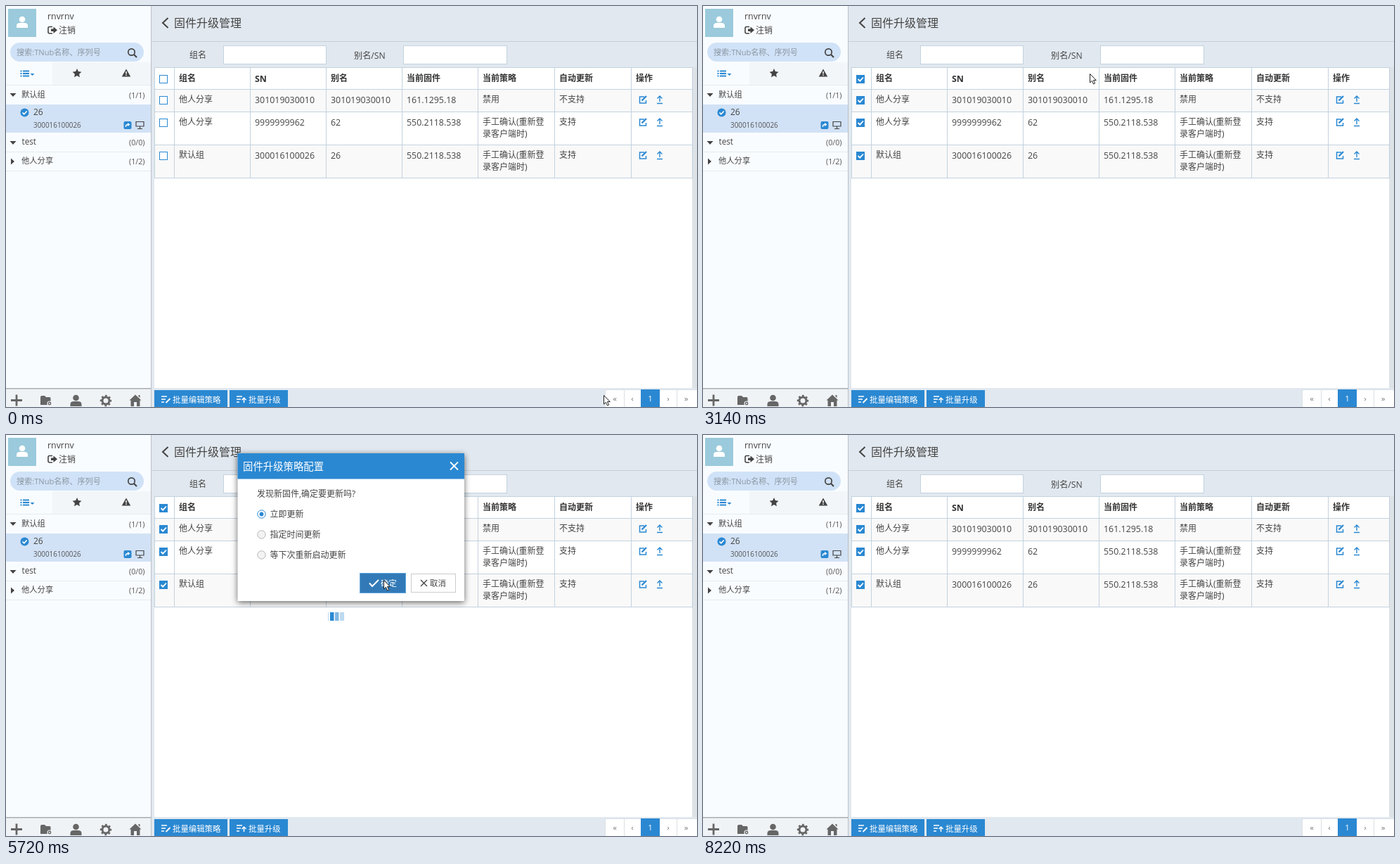
Animation, 983 px wide and 570 px high, one loop 8300 ms. Source, as an HTML page:

```html
<!DOCTYPE html>
<html lang="zh-CN">
<head>
<meta charset="utf-8">
<style>
html, body { margin: 0; width: 100%; height: 100%; overflow: hidden; background: #e1e8ef; }
svg { display: block; font-family: "Open Sans", "Noto Sans CJK SC", "Noto Sans CJK", sans-serif; }
#dialog { filter: drop-shadow(0 2px 4px rgba(0, 0, 0, .6)); }
</style>
</head>
<body>
<svg id="stage" width="983" height="570" viewBox="0 0 983 570"></svg>
<script>
const LOOP = 8300;
const BLUE = '#2a88d2', DARK = '#327ab7', INK = '#444', GRID = '#c3d2de';

const rect = (x, y, w, h, fill, extra = '') =>
  `<rect x="${x}" y="${y}" width="${w}" height="${h}" fill="${fill}" ${extra}/>`;
const box = (x, y, w, h, fill, line) =>
  rect(x + .5, y + .5, w - 1, h - 1, fill, `stroke="${line}"`);
const fill = (d, color) => `<path d="${d}" fill="${color}"/>`;
const line = (d, color, width = 1) =>
  `<path d="${d}" fill="none" stroke="${color}" stroke-width="${width}"/>`;
const disc = (x, y, r, color, extra = '') =>
  `<circle cx="${x}" cy="${y}" r="${r}" fill="${color}" ${extra}/>`;
// Text is placed by its left edge and the middle of its capitals.
const text = (x, mid, str, size = 12, color = INK, extra = '') =>
  `<text x="${x}" y="${mid + size * .37}" font-size="${size}" fill="${color}" ${extra}>${str}</text>`;
const at = (x, y, content) => `<g transform="translate(${x} ${y})">${content}</g>`;
const group = (id, content) => `<g id="${id}">${content}</g>`;

const person = color =>
  disc(0, -4, 4.3, color) + fill('M-8 8V5Q-8 1-3 1H3Q8 1 8 5V8Z', color);

function sidebar() {
  const rule = y => rect(0, y, 206, 1, '#e6ebef');
  const down = y => fill(`M5.500 ${y - 2}h9l-4.500 5z`, INK);
  const count = (y, str) => text(175, y, str, 10.700, '#555');
  const gray = '#666';
  return rect(0, 0, 206, 570, '#f9fcff') + rect(206, 0, 1, 570, '#b9c0c6') +
    rect(3, 4, 40, 40, '#9acadb') + at(23, 23, person('#fff')) +
    text(59, 14, 'rnvrnv', 12.400) + text(75, 35, '注销') +
    line('M66 29.500H62Q60 29.500 60 31.500V37Q60 39 62 39H66', INK, 1.600) +
    fill('M64 32.500H67.500V29.500L73 34.300L67.500 39V36H64Z', INK) +
    rect(6, 52, 190, 27, '#d0e2f7', 'rx="13.500"') +
    text(15, 66, '搜索:TNub名称、序列号', 11.100, '#8b96a2') +
    disc(178.500, 65.500, 4.700, 'none', `stroke="${INK}" stroke-width="1.700"`) +
    line('M182 69L186 73', INK, 2.200) +
    rect(66, 80, 140, 32, '#f3f6f9') +
    line('M20.500 92.500h2m1.500 0h9M20.500 96h2m1.500 0h9M20.500 99.500h2m1.500 0h9', BLUE, 1.800) +
    fill('M34.500 96h6l-3 3z', BLUE) +
    fill('M101 89l1.900 4.100 4.500 .6-3.300 3.100 .8 4.500-3.900-2.200-3.900 2.200 .8-4.500-3.300-3.100 4.500-.6z', INK) +
    fill('M171 89.500L177.300 100.500H164.700Z', INK) + line('M171 93v3.500m0 1v1.500', '#fff', 1.500) +
    rule(112) + down(126) + text(22, 126, '默认组', 11.300) + count(127, '(1/1)') +
    rect(0, 140, 206, 40, '#d2e2f6') + disc(26.500, 151.500, 6, BLUE) +
    line('M23.500 151.500l2.200 2.300 4-4.300', '#fff', 1.700) +
    text(39, 151, '26') + text(39, 169, '300016100026', 9.900, '#555') +
    rect(167.500, 164, 11, 11, BLUE, 'rx="2"') +
    line('M170.500 172V170.500Q170.500 168.500 174 168.500', '#fff', 1.400) + fill('M173 166l3.500 2.500-3.500 2.500z', '#fff') +
    line('M185 164.500H196V171H185ZM190.500 171V174M187 174.500H194', INK, 1.200) +
    down(194) + text(22.500, 193, 'test', 11.700) + count(194, '(0/0)') + rule(207) +
    fill('M7 216.500l5 4.500-5 4.500z', INK) + text(22, 220, '他人分享', 11.300) + count(221, '(1/2)') + rule(234) +
    rect(0, 544, 206, 26, '#f0f3f6') + rect(0, 543, 206, 1.500, '#a9adb1') +
    line('M15 552.500V568.500M7 560.500H23', gray, 2.800) +
    fill('M49 556q0-2 2-2h4l2 2h5q1.500 0 1.500 1.500V567H49Z', gray) +
    disc(62, 565, 3, gray, 'stroke="#f0f3f6" stroke-width="1.200"') + disc(62, 565, 1, '#f0f3f6') +
    at(99.500, 561, person(gray)) +
    disc(142, 561, 5, 'none', `stroke="${gray}" stroke-width="3"`) +
    disc(142, 561, 7, 'none', `stroke="${gray}" stroke-width="2.400" stroke-dasharray="2.750" stroke-dashoffset="1.300"`) +
    fill('M184 552.500l8.500 8h-2V569H186V563H182V569H177.500V560.500H175.500ZM188.500 553h2v4l-2-2z', gray);
}

const columns = [211, 239, 347, 455, 563, 671, 780, 889, 976];
const rowEdges = [87, 118, 150, 197, 244];
const rowMiddles = [103, 133, 165, 212];
const rows = [
  ['组名', 'SN', '别名', '当前固件', '当前策略', '自动更新', '操作'],
  ['他人分享', '301019030010', '301019030010', '161.1295.18', '禁用', '不支持'],
  ['他人分享', '9999999962', '62', '550.2118.538', '手工确认(重新登', '支持'],
  ['默认组', '300016100026', '26', '550.2118.538', '手工确认(重新登', '支持']
];

function table() {
  let out = rect(211, 87, 765, 456, '#fff') + rect(976.500, 87, 6.500, 456, '#dde2e6');
  for (const i of [1, 3])
    out += rect(211, rowEdges[i], 765, rowEdges[i + 1] - rowEdges[i], '#f9f9f9');
  out += line(columns.map(x => `M${x + .5} 87V245`).join('') +
    rowEdges.map(y => `M211 ${y + .5}H976`).join(''), GRID);
  rows.forEach((cells, r) => {
    const y = rowMiddles[r];
    cells.forEach((str, c) => {
      const size = /^[\w.]+$/.test(str) ? 12.400 : 12;
      out += text(columns[c + 1] + 7, y, str, size, r ? INK : '#333', r ? '' : 'font-weight="700"');
    });
    if (r > 1) out += text(678, y + 17, '录客户端时)');
    out += box(218, y - 5, 12, 12, '#fff', BLUE);
    if (r) out += at(906, y,
      line('M2-4H-4.500V5H4.500V1', BLUE, 1.500) + line('M-1.500 1.500L5-5', BLUE, 2.300) +
      line('M24 3V-5M20.500-1.500L24-5L27.500-1.500M20 5.500H28', BLUE, 1.400));
  });
  const ticks = rowMiddles.map(y => rect(218, y - 5, 12, 12, BLUE, 'rx="1"') +
    line(`M220.500 ${y + 1}l2.700 2.700 4.800-5.200`, '#fff', 1.800)).join('');
  return out + group('ticks', ticks);
}

function footer() {
  const page = (x, str, color = '#777') => text(x, 558, str, 11.500, color, 'text-anchor="middle"');
  const lines = x => line(`M${x} 555h8m-8 4h6m-6 4h4`, '#fff', 1.500);
  return rect(211, 546, 104, 24, BLUE) + lines(221) + line('M227.500 564l6-6', '#fff', 1.800) +
    text(237, 559.500, '批量编辑策略', 11.400, '#fff') +
    rect(318, 546, 83, 24, BLUE) + group('focus', box(317, 545, 85, 27, DARK, '#62a5dc')) +
    lines(328) + line('M338.500 564V557M335.500 560l3-3 3 3', '#fff', 1.500) +
    text(345, 559.500, '批量升级', 11.400, '#fff') +
    box(852, 545, 133, 28, '#fff', '#dbe0e4') + line('M879.500 545V570M954.500 545V570', '#dbe0e4') +
    rect(903, 545, 27, 25, BLUE) +
    page(866, '«') + page(891, '‹') + page(916.500, '1', '#fff') + page(942, '›') + page(967.500, '»');
}

function dialog() {
  const options = ['立即更新', '指定时间更新', '等下次重新启动更新'].map((str, i) => {
    const y = 112.500 + i * 29;
    return disc(363.500, y, 5.700, i ? '#f3f3f3' : '#fff', `stroke="${i ? '#b5b5b5' : BLUE}"`) +
      (i ? '' : disc(363.500, y, 2.900, BLUE)) + text(375.500, y, str);
  }).join('');
  return rect(329.500, 26, 322.500, 210, '#fff') + rect(329.500, 26, 322.500, 36.500, BLUE) +
    text(337, 44.500, '固件升级策略配置', 14.400, '#fff') +
    line('M632 38.500l11 11m0-11l-11 11', '#fff', 1.800) +
    text(357, 83.500, '发现新固件,确定要更新吗?') + options +
    rect(504, 197, 64, 27, BLUE) + group('hover', rect(504, 197, 64, 27, DARK)) +
    group('pressed', box(503, 196, 66, 29, 'none', '#62a5dc')) +
    line('M517 210.500l4 4.500 9-9', '#fff', 1.900) + text(533, 210.500, '确定', 11.400, '#fff') +
    box(576, 197, 64, 27, '#fff', '#ccc') +
    line('M590 206l9 9m0-9l-9 9', INK, 1.400) + text(603, 210.500, '取消', 11.400);
}

const loader = rect(458, 252, 1, 12, '#b9d8f0') + rect(461, 252, 5.500, 12, BLUE) +
  rect(468, 252, 5.500, 12, '#7db7e4') + rect(475, 252, 6, 12, '#bcdaf1');
const arrow = '<path d="M.5.5V13L3.400 10.300L5.500 15L7.600 14L5.500 9.500H9.300Z" fill="#fff" stroke="#222"/>';
const hand = '<path d="M1 1.500Q2.500-.5 3.500 1.500V6Q5 5 6 6.300Q7.500 5.500 8.300 7Q10 6.500 10 8.500V12L8.500 15H2.500L-1.500 9.500Q-1 7.500 1 9Z" fill="#fff" stroke="#222"/>';

const stage = document.getElementById('stage');
stage.innerHTML = sidebar() + rect(207, 50, 776, 1, '#c8d0d7') +
  line('M230.500 17L223 24L230.500 31', INK, 2) + text(239, 24, '固件升级管理', 16) +
  text(261, 70, '组名') + box(309, 56, 147, 27, '#fff', GRID) +
  text(495, 70, '别名/SN', 12.200) + box(565, 56, 148, 27, '#fff', GRID) +
  table() + footer() + group('loader', loader) + group('dialog', dialog()) +
  group('cursor', group('arrow', arrow) + group('hand', hand));

// Pointer path: time, x, y
const path = [
  [0, 850, 553], [70, 842, 545], [220, 770, 490], [700, 275, 165], [900, 231, 133],
  [1040, 231, 133], [1130, 231, 112], [1310, 223, 106], [1600, 223, 106],
  [1760, 245, 190], [2100, 355, 500], [2300, 378, 559], [2620, 378, 559],
  [2800, 480, 330], [3000, 621, 27], [3220, 510, 135], [3320, 503, 129],
  [3540, 503, 129], [3620, 526, 138], [3700, 476, 132], [3780, 506, 140],
  [4180, 506, 140], [4620, 533, 204], [5020, 533, 204], [5170, 537, 206],
  [6200, 537, 206], [6260, 580, 232], [6500, 858, 391], [6910, 972, 480],
  [7110, 969, 460], [7500, 972, 520], [7800, 978, 552], [7840, 990, 560], [LOOP, 990, 560]
];

function pointer(t) {
  const i = path.findIndex(p => p[0] > t);
  const [t0, x0, y0] = path[i - 1], [t1, x1, y1] = path[i];
  const u = (t - t0) / (t1 - t0);
  return [x0 + (x1 - x0) * u, y0 + (y1 - y0) * u].map(Math.round);
}

const parts = {};
for (const el of stage.querySelectorAll('[id]')) parts[el.id] = el;

function draw() {
  const t = performance.now() % LOOP;
  const within = (from, to) => t >= from && t < to;
  const show = (id, on) => parts[id].setAttribute('visibility', on ? 'visible' : 'hidden');
  const overButton = within(2250, 2680), overConfirm = within(4560, 5870);
  const overLink = overButton || within(4560, 5720);
  const open = within(3930, 5870);
  parts.dialog.style.display = open ? '' : 'none';
  show('ticks', t >= 1530);
  show('focus', overButton || within(5870, 8220));
  show('hover', overConfirm);
  show('pressed', within(5570, 5870));
  show('loader', within(5720, 5870));
  show('hand', overLink);
  show('arrow', !overLink);
  parts.cursor.setAttribute('transform', `translate(${pointer(t)})`);
  requestAnimationFrame(draw);
}
draw();
</script>
</body>
</html>
```
